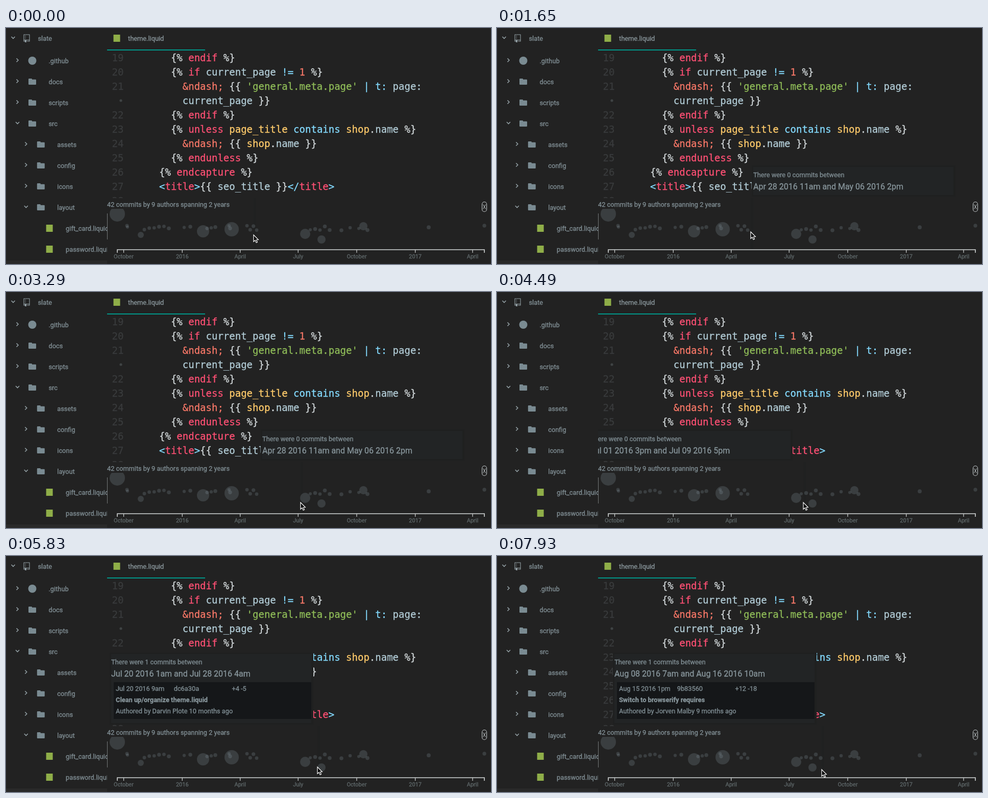
Animation, 950 px wide and 462 px high, one loop 8000 ms. Source, as an HTML page with a canvas:

```html
<!DOCTYPE html>
<html lang="en">
<head>
<meta charset="utf-8">
<title>Commit timeline</title>
<style>
html, body { margin: 0; width: 100%; height: 100%; overflow: hidden; background: #222; }
canvas { display: block; }
</style>
</head>
<body>
<canvas id="stage" width="950" height="462"></canvas>
<script>
const ctx = document.getElementById('stage').getContext('2d');
const LOOP = 8000, STEP = 149.5;
const SIDE = 198, WIDTH = 950;
const BG = '#222222', EDGE = '#1f2020', TEXT = '#829096', ICON = '#7a8b92', OUTLINE = '#93a0a5', AXIS = '#d4d8d8';
const UI = 'Roboto, sans-serif', SMALL = '12.8px ' + UI, CODE_FONT = '19px "DejaVu Sans Mono", monospace';
const CHAR = 11.44, LINE = 28;

const INK = { w: '#d2d8da', p: '#ff5074', v: '#b2ccd6', c: '#84dbff', o: '#f87868', g: '#8fbc58', y: '#ffcb6b' };

// Each line: indent in columns, then tokens with their ink as first letter
const CODE = [
  [2, 'w{% ~pendif~w %}'],
  [2, 'w{% ~pif~v current_page ~c!= ~o1~w %}'],
  [4, "o&ndash;~w {{ ~g'general.meta.page'~c | t:~v page:"],
  [4, 'vcurrent_page~w }}', 'wrapped'],
  [2, 'w{% ~pendif~w %}'],
  [2, 'w{% ~punless ~ypage_title ~ccontains ~yshop~w.~vname~w %}'],
  [4, 'o&ndash;~w {{ ~yshop~w.~vname~w }}'],
  [2, 'w{% ~pendunless~w %}'],
  [0, 'w{% ~pendcapture~w %}'],
  [0, 'c<~ptitle~c>~w{{ ~vseo_title~w }}~c</~ptitle~c>'],
  [0, 'w']
];

// Label, depth, icon, open state
const TREE = [
  ['.github', 0, 'disc', false], ['docs', 0, 'folder', false],
  ['scripts', 0, 'folder', false], ['src', 0, 'folder', true],
  ['assets', 1, 'folder', false], ['config', 1, 'folder', false],
  ['icons', 1, 'folder', false], ['layout', 1, 'folder', true],
  ['gift_card.liquid', 2, 'file'], ['password.liquid', 2, 'file']
];

// Time axis
const HOUR = 3600000, HOURS_PER_PX = 19.245, WINDOW = 194.6 * HOUR;
const ORIGIN_X = 493, ORIGIN = Date.UTC(2016, 3, 28, 11, 30);
const timeAt = x => ORIGIN + (x - ORIGIN_X) * HOURS_PER_PX * HOUR;
const xOf = time => ORIGIN_X + (time - ORIGIN) / HOUR / HOURS_PER_PX;

const COMMITS = [
  { time: Date.UTC(2016, 6, 20, 9), hash: 'dc6a30a', delta: '+4 -5',
    title: 'Clean up/organize theme.liquid', by: 'Authored by Darvin Plote 10 months ago' },
  { time: Date.UTC(2016, 7, 15, 13), hash: '9b83560', delta: '+12 -18',
    title: 'Switch to browserify requires', by: 'Authored by Jorven Malby 9 months ago' }
];

// Large commits as x, y, radius; runs of small ones as first x, last x, count
const LARGE = [[218, 364, 15], [264, 405, 6], [386, 398, 12], [442, 394, 14],
  [586, 403, 10], [618, 414, 8], [700, 388, 8]];
const RUNS = [[237, 238, 2], [271, 319, 6], [349, 361, 2], [394, 410, 3], [437, 439, 2],
  [472, 491, 4], [596, 634, 5], [657, 708, 4], [828, 937, 2]];

// Pointer glides: first step, last step, end x, end y
const HOME = [484, 404];
const GLIDES = [[6, 8, 497, 398], [9, 10, 496, 398], [14, 22, 576, 411],
  [28, 30, 599, 411], [38, 41, 623, 414], [51, 53, 635, 417]];

function pointerAt(step) {
  let [x, y] = HOME;
  for (const [from, to, endX, endY] of GLIDES) {
    const p = Math.min(1, Math.max(0, (step - from) / (to - from)));
    const ease = 1 - (1 - p) ** 1.3;
    x += (endX - x) * ease;
    y += (endY - y) * ease;
  }
  return [Math.round(x), Math.round(y)];
}

function seeded(seed) {
  return () => (seed = seed * 16807 % 2147483647) / 2147483647;
}

function rect(x, y, w, h, color) {
  ctx.fillStyle = color;
  ctx.fillRect(x, y, w, h);
}

// A hairline outline gives the text its slightly heavy look
function label(str, x, y, color = TEXT, font = SMALL, align = 'left') {
  ctx.font = font;
  ctx.fillStyle = ctx.strokeStyle = color;
  ctx.lineWidth = 0.3;
  ctx.textAlign = align;
  ctx.fillText(str, x, y);
  ctx.strokeText(str, x, y);
}

function disc(x, y, r, color) {
  ctx.fillStyle = color;
  ctx.beginPath();
  ctx.arc(x, y, r, 0, Math.PI * 2);
  ctx.fill();
}

function line(points, color, width) {
  ctx.strokeStyle = color;
  ctx.lineWidth = width;
  ctx.beginPath();
  points.forEach(([x, y]) => ctx.lineTo(x, y));
  ctx.stroke();
}

function clipped(x, y, w, h, draw) {
  ctx.save();
  ctx.beginPath();
  ctx.rect(x, y, w, h);
  ctx.clip();
  draw();
  ctx.restore();
}

function chevron(x, y, open) {
  line(open ? [[x - 3.5, y - 2], [x, y + 1.5], [x + 3.5, y - 2]]
            : [[x - 2, y - 3.5], [x + 1.5, y], [x - 2, y + 3.5]], OUTLINE, 1.6);
}

function folder(x, y) {
  ctx.fillStyle = ICON;
  ctx.beginPath();
  ctx.roundRect(x - 7.5, y - 6, 7, 5, 1.2);
  ctx.roundRect(x - 7.5, y - 4.3, 15, 10.3, 1.2);
  ctx.fill();
}

function book(x, y) {
  line([[x - 3, y + 6], [x - 5, y + 6], [x - 5, y - 7], [x + 6, y - 7], [x + 6, y + 6], [x + 1, y + 6]], OUTLINE, 1.1);
  line([[x - 5, y + 3.5], [x + 6, y + 3.5]], OUTLINE, 1);
  rect(x - 3, y + 4, 3, 4, OUTLINE);
  for (let i = 0; i < 3; i++) rect(x - 2.5, y - 5 + i * 2.7, 1.2, 1.2, OUTLINE);
}

const badge = (x, y) => rect(x - 6.5, y - 7, 13, 14, '#8fae48');

function sidebar() {
  rect(0, 455, SIDE, 7, '#292929');
  chevron(14, 19, true);
  book(40, 20);
  label('slate', 62.5, 24.5);
  TREE.forEach(([name, depth, icon, open], i) => {
    const y = 64 + i * 41, x = 51.5 + depth * 16.8;
    if (icon === 'file') badge(x, y);
    else chevron(x - 29, y - 1, open);
    if (icon === 'folder') folder(x, y);
    if (icon === 'disc') disc(x, y, 8, ICON);
    label(name, x + 32, y + 4.5);
  });
}

function editor() {
  badge(217, 20);
  label('theme.liquid', 239, 24.5, '#8a979c');
  rect(SIDE, 42, 192, 2, '#009688');
  let number = 19;
  CODE.forEach(([indent, tokens, wrapped], i) => {
    const y = 65 + i * LINE;
    if (wrapped) disc(225, y - 7, 2.6, '#3f4344');
    else label(number++, 207.5, y, '#393b3c', CODE_FONT);
    let col = indent;
    tokens.split('~').forEach(token => {
      const str = token.slice(1);
      label(str, 300 + col * CHAR, y, INK[token[0]], CODE_FONT);
      col += str.length;
    });
  });
}

function dots() {
  const tint = 'rgba(145,165,172,.22)', random = seeded(11);
  LARGE.forEach(([x, y, r]) => disc(x, y, r, tint));
  RUNS.forEach(([from, to, count]) => {
    for (let i = 0; i < count; i++) {
      const x = from + (to - from) * i / (count - 1);
      disc(x, 387 + 9 * random(), 3 + random(), tint);
    }
  });
}

function axis() {
  line([[218, 440], [218, 434], [937, 434], [937, 440]], AXIS, 1.6);
  for (let quarter = 0; quarter < 7; quarter++) {
    const date = new Date(Date.UTC(2015, 9 + quarter * 3));
    const x = xOf(date), january = date.getUTCMonth() === 0;
    const name = january ? date.getUTCFullYear() : date.toLocaleString('en-US', { month: 'long', timeZone: 'UTC' });
    line([[x, 434], [x, 440]], AXIS, 1.2);
    label(name, x, 451, '#5f686a', '11px ' + UI, 'center');
  }
}

function timeline(pointerX) {
  rect(pointerX + 1, 333, 5, 100, '#202121');
  label('42 commits by 9 authors spanning 2 years', SIDE, 350, TEXT, '12.75px ' + UI);
  clipped(SIDE, 354, WIDTH - SIDE, 80, dots);
  rect(SIDE, 363, 1, 51, '#737779');
  axis();
  ctx.strokeStyle = '#bfc5c7';
  ctx.lineWidth = 1.1;
  ctx.beginPath();
  ctx.roundRect(932.5, 340.5, 9, 19, 4.5);
  ctx.stroke();
  line([[934.5, 345.5], [939.5, 354.5]], '#bfc5c7', 1);
  line([[939.5, 345.5], [934.5, 354.5]], '#bfc5c7', 1);
}

function stamp(time) {
  const date = new Date(time), hour = date.getUTCHours();
  const month = date.toLocaleString('en-US', { month: 'short', timeZone: 'UTC' });
  const day = String(date.getUTCDate()).padStart(2, '0');
  return `${month} ${day} ${date.getUTCFullYear()} ${hour % 12 || 12}${hour < 12 ? 'am' : 'pm'}`;
}

// Shows the window under the pointer, flipping to its left where space runs out
function tooltip(pointerX) {
  const boxWidth = 399, from = timeAt(pointerX - 3), to = from + WINDOW;
  const x = pointerX + 3 + boxWidth < WIDTH ? pointerX + 3 : pointerX + 3 - boxWidth;
  const found = COMMITS.filter(({ time }) => time >= from && time < to);
  const top = 269 - found.length * 80;
  rect(x, top, boxWidth, 330 - top, EDGE);
  rect(x + 3, top + 3, boxWidth - 7, 324 - top, '#222425');
  label(`There were ${found.length} commits between`, x + 3, top + 23);
  label(`${stamp(from)} and ${stamp(to)}`, x + 3, top + 47, '#89979d', '16px ' + UI);
  found.forEach(({ time, hash, delta, title, by }) => {
    rect(x + 8, 247, boxWidth - 12, 72, '#151719');
    [stamp(time), hash, delta].forEach((str, i) => label(str, x + 12 + i * 113.7, 264));
    label(title, x + 12, 286, '#89979d', 'bold ' + SMALL);
    label(by, x + 12, 308);
  });
}

function pointer(x, y) {
  ctx.beginPath();
  [[1, 1], [1, 14.2], [4, 11.5], [6.2, 16.2], [8.4, 15.2], [6.3, 10.7], [10.3, 10.5]]
    .forEach(([dx, dy]) => ctx.lineTo(x + dx, y + dy));
  ctx.closePath();
  ctx.fillStyle = '#000';
  ctx.fill();
  ctx.strokeStyle = '#fff';
  ctx.lineWidth = 1.2;
  ctx.stroke();
}

function draw(t) {
  const step = Math.floor(t / STEP);
  const [px, py] = pointerAt(step);
  const rested = GLIDES.filter(([, to]) => to < step).pop();
  rect(0, 0, WIDTH, 462, BG);
  clipped(0, 0, SIDE, 462, sidebar);
  clipped(SIDE, 0, WIDTH - SIDE, 333, () => {
    editor();
    if (rested) tooltip(rested[2]);
  });
  timeline(px);
  pointer(px, py);
}

const start = performance.now();
function tick() {
  draw((performance.now() - start) % LOOP);
  requestAnimationFrame(tick);
}
tick();
</script>
</body>
</html>
```
